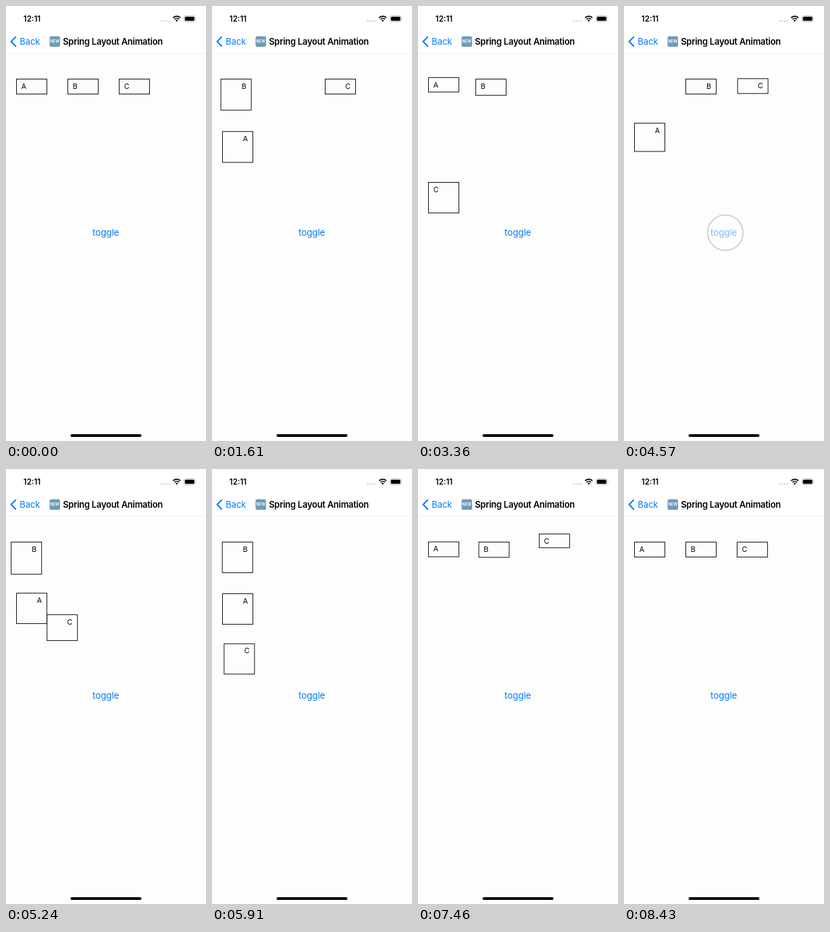
Write an HTML page that moves like this. It is 296 px wide and 640 px high and loops after 8.46 s.

```html
<!DOCTYPE html>
<html lang="en">
<head>
<meta charset="utf-8">
<title>Spring layout animation</title>
<style>
html, body { margin: 0; width: 100%; height: 100%; overflow: hidden; background: #fdfdfd; }
svg { display: block; width: 296px; height: 640px; font-family: Inter, Roboto, sans-serif; }
.blue { fill: #007aff; }
.bold { font-weight: 600; }
#boxes rect { fill: none; stroke: #111; }
#boxes text { font-size: 10.6px; }
</style>
</head>
<body>
<svg id="stage" viewBox="0 0 296 640">
  <rect width="296" height="69" fill="#fff"/>
  <rect y="69" width="296" height="1" fill="#f1f1f1"/>

  <text class="bold" x="25.8" y="23" font-size="11.5">12:11</text>
  <g fill="#c4c4c4">
    <circle cx="230.5" cy="22" r="1.1"/><circle cx="234.2" cy="22" r="1.1"/>
    <circle cx="237.9" cy="22" r="1.1"/><circle cx="241.6" cy="22" r="1.1"/>
  </g>
  <g fill="none" stroke="#000" stroke-width="1.7">
    <path d="M247.3 17.3a7.7 7.7 0 0 1 10.8 0M249.4 19.6a4.7 4.7 0 0 1 6.6 0"/>
  </g>
  <path d="M250.9 21.2a2.6 2.6 0 0 1 3.6 0l-1.8 2z"/>
  <rect x="263.5" y="14.5" width="16.5" height="8.6" rx="2.6" fill="none" stroke="#aaa" stroke-width=".8"/>
  <rect x="264.8" y="15.8" width="13.9" height="6" rx="1.5"/>
  <path d="M281 17.3q1.4 1.5 0 3z" fill="#aaa"/>

  <path d="M14.2 45.6L7.6 52.3L14.2 59" fill="none" stroke="#007aff" stroke-width="2" stroke-linecap="round" stroke-linejoin="round"/>
  <text class="blue" x="20.3" y="57" font-size="12.9">Back</text>
  <rect x="64.5" y="44.5" width="15.5" height="15.5" rx="2.6" fill="#6f9bb8"/>
  <text class="bold" x="72.2" y="54.4" font-size="5.6" fill="#fff" text-anchor="middle">NEW</text>
  <text class="bold" x="84.2" y="57" font-size="12.9" letter-spacing="-.22">Spring Layout Animation</text>

  <g id="boxes"></g>
  <text id="toggle" class="blue" x="147.7" y="338.4" font-size="13.4" letter-spacing="-.1" text-anchor="middle">toggle</text>
  <circle id="touch" cx="150" cy="333.5" fill="none" stroke="#888" stroke-width="1.3"/>
  <rect x="95.5" y="630" width="105" height="4" rx="2"/>
</svg>
<script>
const LOOP = 8460, STEP = 76;
const $ = id => document.getElementById(id);
const clamp = v => Math.min(1, Math.max(0, v));

// Start times of the springs for A, B and C after each tap
const taps = [
  [1035, 1358, 1671],
  [2805, 3143, 3455],
  [4370, 4773, 5073],
  [6332, 6650, 6965]
];

// Row slot and the offset (in steps) to the column slot
const boxes = [
  { name: "A", dx: 0, dy: 1 },
  { name: "B", dx: -1, dy: 0 },
  { name: "C", dx: -2, dy: 2 }
];

function add(tag) {
  return $("boxes").appendChild(document.createElementNS("http://www.w3.org/2000/svg", tag));
}

for (const box of boxes) {
  box.rect = add("rect");
  box.label = add("text");
  box.label.textContent = box.name;
}

function set(el, attrs) {
  for (const key in attrs) el.setAttribute(key, attrs[key]);
}

// Unit step of a spring: mass 1, stiffness 100, damping 10
function spring(ms) {
  if (ms <= 0) return 0;
  const t = ms / 1000, w = Math.sqrt(75);
  return 1 - Math.exp(-5 * t) * (Math.cos(w * t) + 5 / w * Math.sin(w * t));
}

function drawBoxes(t) {
  const column = taps.filter(tap => t >= tap[0]).length % 2 === 1;
  boxes.forEach((box, i) => {
    const p = taps.reduce((sum, tap, k) => sum + (k % 2 ? -1 : 1) * spring(t - tap[i]), 0);
    const x = 15.5 + STEP * (i + box.dx * p);
    const y = 107.5 + STEP * box.dy * p;
    set(box.rect, { x, y, width: 45, height: 22 + 23 * p });
    set(box.label, {
      x: x + (column ? 37.6 : 7.2),
      y: y + 14.3,
      "text-anchor": column ? "end" : "start"
    });
  });
}

function drawTouch(t) {
  const tap = taps.find(s => t >= s[0] - 75 && t < s[0] + 287);
  const d = tap ? t - tap[0] : 0;
  const grow = clamp((d - 127) / 160);
  set($("touch"), { r: 17.5 + 18.7 * grow, opacity: tap ? 1 - grow : 0 });
  const pressed = 1 - .8 * clamp((d + 75) / 100);
  const released = .2 + .8 * clamp((d - 157) / 114);
  set($("toggle"), { opacity: tap ? Math.max(pressed, released) : 1 });
}

function frame() {
  const t = performance.now() % LOOP;
  drawBoxes(t);
  drawTouch(t);
  requestAnimationFrame(frame);
}
frame();
</script>
</body>
</html>
```
